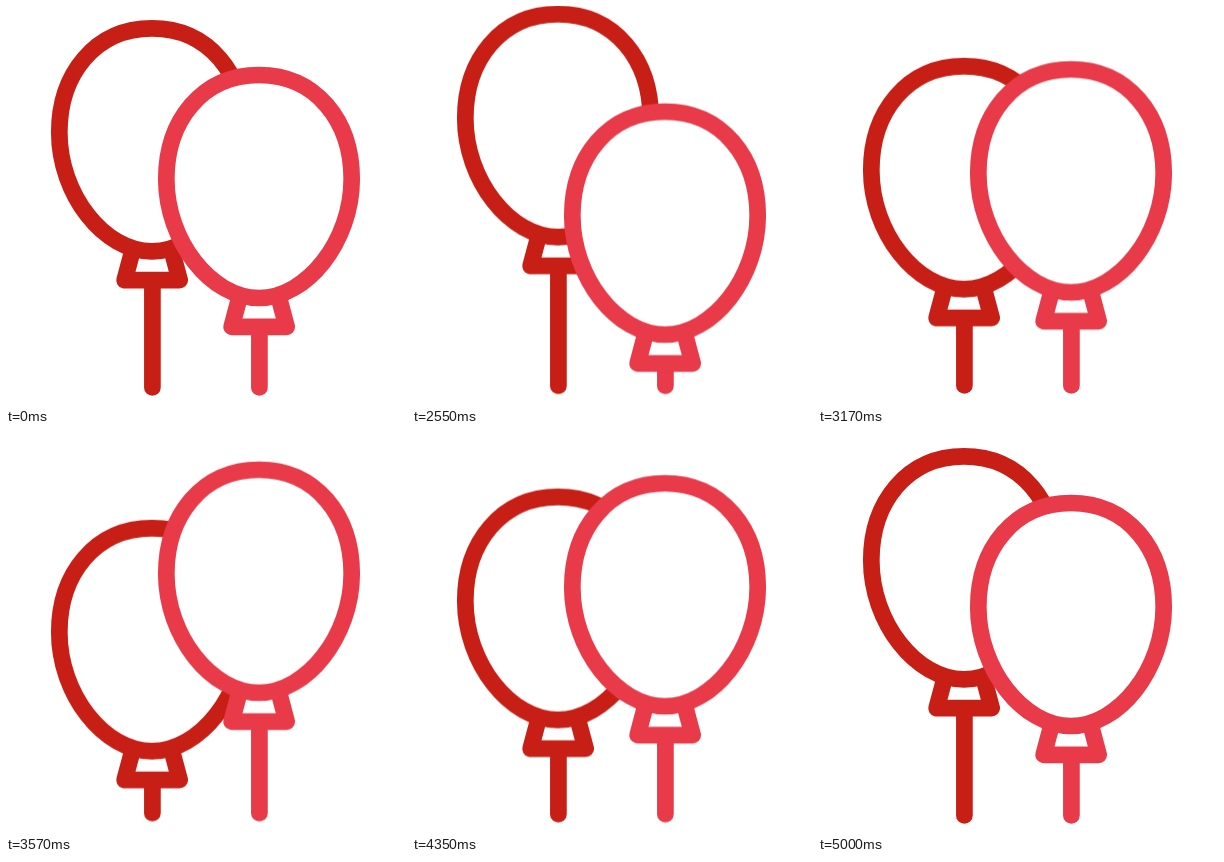
Animation, 400 px wide and 400 px high, one loop 5020 ms. Source, as an HTML page without scripts:

```html
<!DOCTYPE html>
<html lang="en">
<head>
<meta charset="utf-8">
<title>Balloons</title>
<style>
  html, body { margin: 0; width: 100%; height: 100%; overflow: hidden; background: #fff; }
  svg { display: block; width: 100vw; height: 100vh; }

  .balloon {
    fill: #fff;
    stroke-width: 16.7;
    stroke-linecap: round;
    stroke-linejoin: round;
  }
  .dark { stroke: #c71f16; }
  .light { stroke: #e83a48; }

  .body, .rope {
    animation: 5020ms cubic-bezier(.333, 0, .667, 1) infinite;
  }
  .rope { animation-name: tug; }
  .dark .body { --first: -16px; --second: 77px; animation-name: bob; }
  .light .body { --first: 38px; --second: -37.5px; animation-name: bob; }

  @keyframes bob {
    0%, 39.84% { transform: translateY(0); }
    48.7% { transform: translateY(var(--first)); }
    74.9% { transform: translateY(var(--second)); }
    99.3%, 100% { transform: translateY(0); }
  }
  @keyframes tug {
    0%, 39.84% { transform: translateY(0); }
    48.7% { transform: translateY(-1.6px); }
    74.9% { transform: translateY(-2.4px); }
    99.3%, 100% { transform: translateY(0); }
  }
</style>
</head>
<body>
<svg viewBox="0 0 400 400">
  <defs>
    <g id="shape">
      <path d="M232.5 295 L225.6 320.8 H280.7 L273.8 295"/>
      <path d="M253 69 C310 69 345.7 115 345.7 173 C345.7 235 301 292 253 292 C205 292 160.3 235 160.3 173 C160.3 115 196 69 253 69 Z"/>
    </g>
  </defs>
  <g class="balloon dark">
    <path class="rope" d="M146.4 250 V381.4"/>
    <g class="body"><use href="#shape" x="-107" y="-46.6"/></g>
  </g>
  <g class="balloon light">
    <path class="rope" d="M253.4 282 V381.4"/>
    <g class="body"><use href="#shape"/></g>
  </g>
</svg>
</body>
</html>
```
